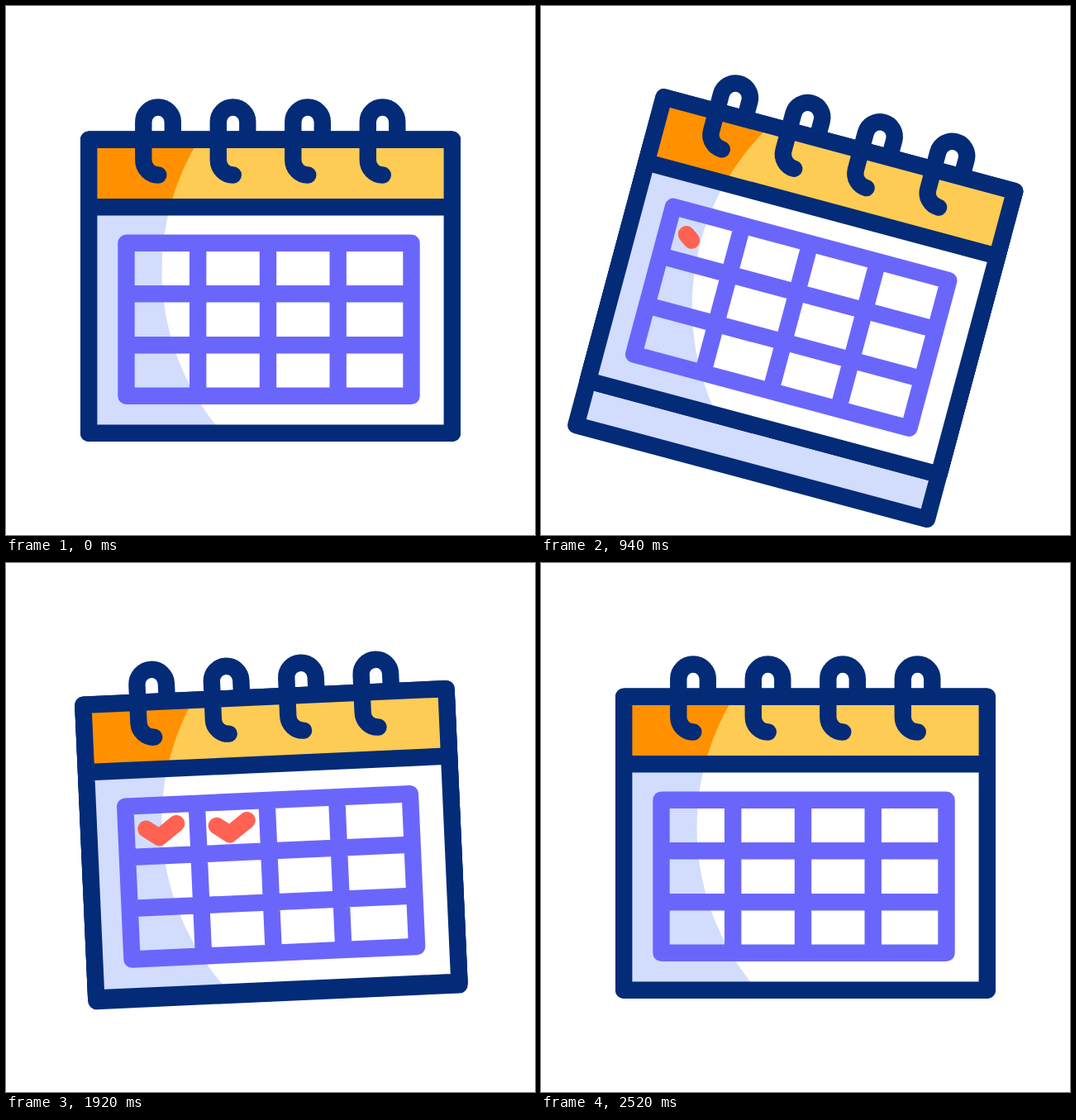
An HTML page for the animation above (3.6 s loop, 640 by 640 pixels).

```html
<!DOCTYPE html>
<html lang="en">
<head>
<meta charset="utf-8">
<title>Calendar</title>
<style>
  html, body { margin: 0; width: 100%; height: 100%; overflow: hidden; background: #fff; }
  svg { display: block; width: 100%; height: 100%; }
  .line { fill: none; stroke-width: 20.4; stroke-linejoin: round; }
  .navy { stroke: #032b77; }
  .violet { stroke: #6b66fb; }
  .coral { stroke: #ff6252; stroke-linecap: round; }
</style>
</head>
<body>
<svg viewBox="0 0 640 640">
  <defs>
    <clipPath id="header"><path d="M100.2 161.8H539.8V243.3H100.2Z"/></clipPath>
    <clipPath id="body"><path d="M100.2 243.3H539.8V516.8H100.2Z"/></clipPath>
    <g id="page">
      <g clip-path="url(#header)">
        <rect width="640" height="640" fill="#ff9100"/>
        <circle cx="489.5" cy="320" r="301" fill="#fecb54"/>
      </g>
      <g clip-path="url(#body)">
        <rect width="640" height="640" fill="#d2dcfd"/>
        <circle cx="489.5" cy="320" r="301" fill="#fff"/>
      </g>
      <path class="line violet" d="M145.5 286.8H490.5V471.8H145.5ZM232.2 286.8V471.8M317 286.8V471.8M401.7 286.8V471.8M145.5 348.3H490.5M145.5 410.3H490.5"/>
      <path class="line navy" d="M100.2 161.8H539.8V516.8H100.2ZM100.2 243.3H539.8"/>
    </g>
    <path id="ring" class="line navy" stroke-linecap="round" d="M201.8 160V140.3a17.75 17.75 0 0 0-35.5 0V186.5a18 18 0 0 0 18 18"/>
  </defs>
  <g id="calendar">
    <path id="back" class="line navy" style="fill:#d2dcfd" d="M100.2 161.8H539.8V516.8H100.2Z"/>
    <use href="#page"/>
    <g id="front">
      <use href="#page"/>
      <path class="line coral mark" pathLength="1" d="M169.5 315L185 326L206.5 310"/>
      <path class="line coral mark" pathLength="1" d="M255 315L270.5 326L292 310"/>
    </g>
    <use href="#ring"/>
    <use href="#ring" x="90.5"/>
    <use href="#ring" x="181"/>
    <use href="#ring" x="271.5"/>
  </g>
</svg>
<script>
  const LOOP = 3600;
  const calendar = document.getElementById('calendar');
  const back = document.getElementById('back');
  const front = document.getElementById('front');
  const marks = document.querySelectorAll('.mark');

  // Keyframes are [time in ms, value] pairs.
  const swing = [[200, 0], [385, -5.4], [1025, 16], [1685, -6], [2115, 0]];
  const backDrop = [[478, 0], [995, 57.5], [2085, 0]];
  const frontFall = [[2094, 0], [2734, 655]];
  const markDraw = [[[833, 0], [1200, 1]], [[1267, 0], [1633, 1]]];

  const ease = u => u * u * (3 - 2 * u);

  function valueAt(keys, t) {
    if (t <= keys[0][0]) return keys[0][1];
    for (let i = 1; i < keys.length; i++) {
      const [t0, v0] = keys[i - 1], [t1, v1] = keys[i];
      if (t < t1) return v0 + (v1 - v0) * ease((t - t0) / (t1 - t0));
    }
    return keys[keys.length - 1][1];
  }

  function draw(t) {
    calendar.setAttribute('transform', `rotate(${valueAt(swing, t)} 320 320)`);
    back.setAttribute('transform', `translate(0 ${valueAt(backDrop, t)})`);
    front.setAttribute('transform', `translate(0 ${valueAt(frontFall, t)})`);
    front.style.display = t < 2515 ? '' : 'none';
    marks.forEach((mark, i) => {
      const p = valueAt(markDraw[i], t);
      mark.style.display = p > 0 ? '' : 'none';
      mark.style.strokeDasharray = p < 1 ? `${p} 2` : 'none';
    });
  }

  const start = performance.now();
  function tick() {
    draw((performance.now() - start) % LOOP);
    requestAnimationFrame(tick);
  }
  tick();
</script>
</body>
</html>
```
